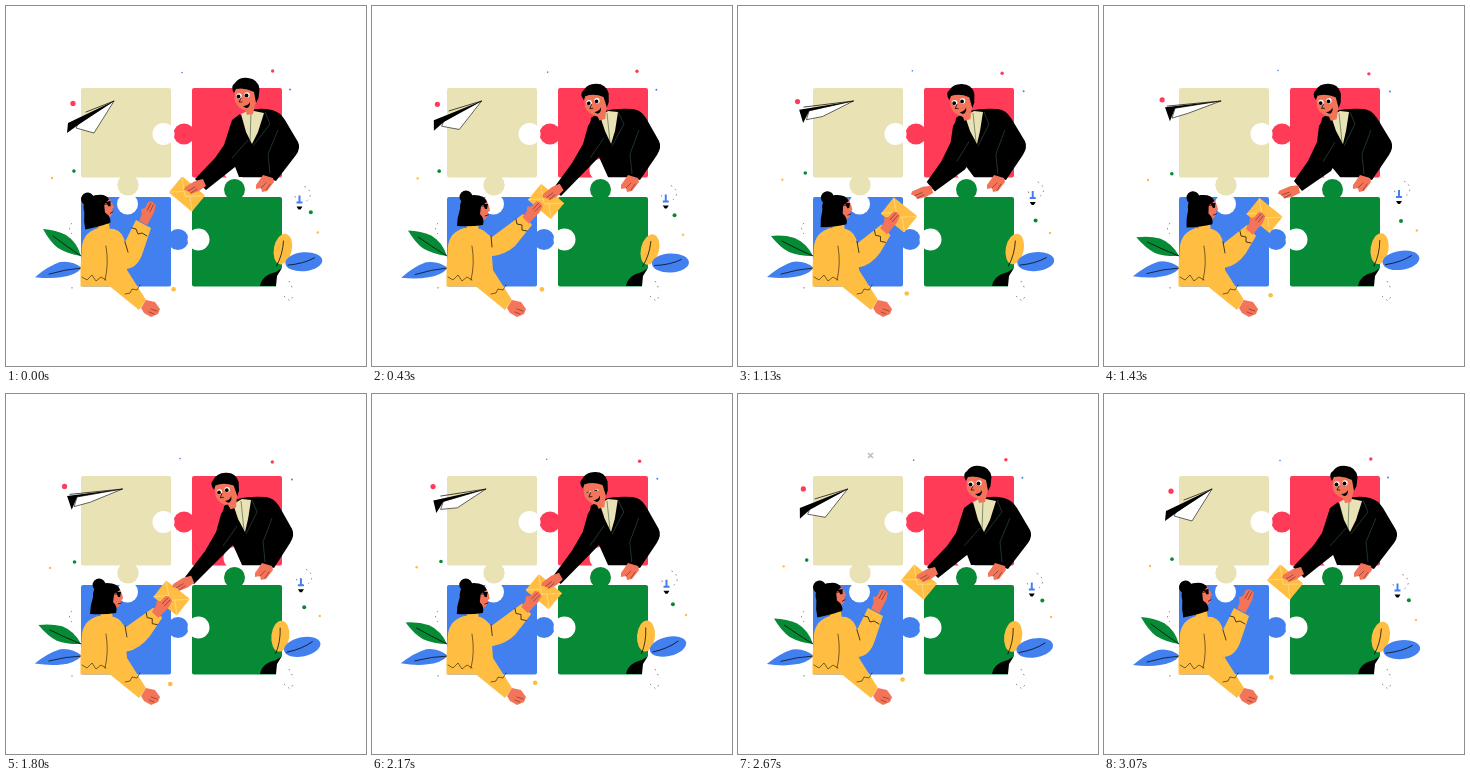
Recreate the animation shown at these times as an HTML page. Size 360 by 360 pixels, loop 3.11 s.

```html
<!DOCTYPE html>
<html lang="en">
<head>
<meta charset="utf-8">
<title>Teamwork puzzle</title>
<style>
html, body { margin: 0; width: 100%; height: 100%; overflow: hidden; background: #fff; }
svg { display: block; width: 100vw; height: 100vh; }
.cream { fill: #e9e2b4; } .red { fill: #ff3b58; } .blue { fill: #4280ef; }
.green { fill: #078a35; } .gold { fill: #ffbe42; } .skin { fill: #f4745a; }
.white { fill: #fff; }
.line { fill: none; stroke: #000; stroke-width: .7; stroke-linecap: round; }
.seam { fill: none; stroke: #35564a; stroke-width: .6; }
.dash { fill: none; stroke: #333; stroke-width: .6; stroke-dasharray: 1.5 4; }
</style>
</head>
<body>
<svg viewBox="0 0 360 360">
  <!-- puzzle -->
  <g class="cream"><rect x="75" y="82" width="90" height="89.5" rx="2"/><circle cx="122" cy="179" r="10.5"/></g>
  <g class="red"><rect x="186" y="82" width="90" height="89.5" rx="2"/><circle cx="178" cy="128" r="10.5"/></g>
  <g class="blue"><rect x="75" y="191" width="90" height="89.5" rx="2"/><circle cx="172" cy="233.5" r="10.5"/></g>
  <g class="white"><circle cx="157.5" cy="128" r="11"/><circle cx="228.5" cy="164" r="11"/><circle cx="121.5" cy="198" r="10.5"/></g>
  <g class="green"><rect x="186" y="191" width="90" height="89.5" rx="2"/><circle cx="228.5" cy="183.5" r="10.5"/></g>
  <circle class="white" cx="192.5" cy="233.5" r="11"/>
  <circle class="cream" cx="122" cy="179" r="10.5"/>

  <!-- paper plane -->
  <path id="wing" class="white" stroke="#000" stroke-width=".6"/>
  <path id="fold"/>
  <path id="crease" class="line"/>

  <!-- leaves -->
  <g id="leafA">
    <path class="green" d="M75 250Q71 236 60 229Q50 224 37 223Q44 236 52 242Q62 248 75 250Z"/>
    <path class="line" d="M75 250Q60 240 47 230"/>
  </g>
  <g id="leafB">
    <path class="blue" d="M76 262Q66 254 54 256Q42 260 29 271Q45 273 56 271Q68 270 76 262Z"/>
    <path class="line" d="M76 262Q60 263 43 268"/>
  </g>
  <path class="white" d="M277 261L270 267V281H277Z"/>
  <path d="M254 280Q256 269 270 266L276 262L271 270L270 280Z"/>
  <g id="leafC"><ellipse class="gold" rx="9" ry="15.5"/><path class="line" d="M-1 -8Q1 6 -3 18"/></g>
  <g id="leafD"><ellipse class="blue" rx="18.5" ry="9.5"/><path class="line" d="M-16 2Q0 2 11 -3"/></g>

  <!-- floating bits -->
  <g id="bulb">
    <path class="dash" d="M5 -22Q10 -20 11 -14Q10 -9 5 -6M-4 -11L-6 -16"/>
    <path class="blue" d="M-1 -13H1V-7H3V-5H-3V-7H-1Z"/>
    <path d="M-3 -2H3L1 1H-1Z"/>
  </g>
  <path class="dash" d="M66 217Q61 223 66 228M66 281V285M278 290L284 295L288 289M283 275L288 285"/>
  <path id="spark" d="M130 59L135 64M135 59L130 64" stroke="#bbb" stroke-width="1.5"/>
  <g id="dots"></g>

  <!-- man -->
  <path id="coat"/>
  <path id="shirt" class="cream"/>
  <path id="coatSeam" class="seam"/>
  <g id="farHand">
    <path class="skin" d="M257 169L267 172L268 176L261 185L256 186L255 182L250 183L250 179Z"/>
    <path class="line" d="M255 182L260 177M260 184L264 178" stroke-opacity=".5"/>
  </g>
  <g id="manHead">
    <path class="skin" d="M-1 10L2 20L8 19L11 6Z"/>
    <path class="skin" d="M-10 -7L-10.5 5Q-8 13 1 16Q7 17 10 9L13 4L11 -6Z"/>
    <path d="M-11 -2Q-15 -9 -10 -12Q-6 -18 3 -17Q13 -16 14.5 -6L13.5 3L11 8L9 -3Q0 -8 -9 -6Z"/>
    <g id="eyes"><circle class="white" cx="-6" cy="1" r="2.7"/><circle class="white" cx="2" cy="0" r="2.7"/><circle cx="-6.5" cy="1.5" r="1.9"/><circle cx="1.5" cy=".5" r="1.9"/></g>
    <path class="line" d="M-4 3L-6 7L-3 7"/>
    <path d="M-2 11Q3 11 5 7Q5 13 1 13Z"/>
  </g>
  <path id="manArm"/>
  <path id="armSeam" class="seam"/>

  <!-- woman -->
  <path class="gold" d="M76 240Q78 226 92 222L108 223Q118 226 119 238L121 264L140 294L133 304L104 280.500H74.500V262Z"/>
  <path id="collar" class="gold"/>
  <path id="womanArm" class="gold"/>
  <path class="line" d="M76 271l5 3l5 -5l4 6l5 -4l5 3M119 288l5 -1l2 -4l5 1l3 -5M100 240Q103 258 99 274" stroke-opacity=".75"/>
  <path id="sleeve" class="line"/>
  <path class="skin" d="M140 294L149 296L154 303L152 308L145 311L138 307L135 302Z"/>
  <path class="line" d="M145 303L151 305M143 306L148 308" stroke-opacity=".5"/>
  <g id="womanHead">
    <path class="skin" d="M2 -9H12Q15 -5 16 2L14 3Q14 10 8 11L3 16H-5V0Z"/>
    <path d="M-14 0Q-15 -13 0 -14Q11 -14 13 -7L7 -3L6 5Q11 10 9 16Q-3 18 -17 17Q-17 9 -14 0Z"/>
    <circle cx="-8" cy="-12" r="6.5"/>
    <path d="M9 -5L14 -5L13 0L11 0Z"/>
    <path class="line" d="M6 -3H11M11 7L14 6"/>
  </g>

  <!-- envelope and hands -->
  <g id="envelope">
    <rect class="gold" x="-15" y="-10.5" width="30" height="21" rx="1"/>
    <path d="M-15 -10L0 3L15 -10M-15 10L-4 0M15 10L4 0" fill="none" stroke="#ffe09a" stroke-width=".6"/>
  </g>
  <g id="manHand">
    <path class="skin" d="M9 -9L1 -7L-9 -1L-10 2L-6 3L-3 6L5 3L12 -2Z"/>
    <path class="line" d="M-6 3L1 -1M-3 5L3 1" stroke-opacity=".5"/>
  </g>
  <g id="womanHand">
    <path class="skin" d="M-11 -4L-4 -5L0 -8L3 -5L10 -5L12 -2L11 3L4 5L-4 5L-11 5Z"/>
    <path class="line" d="M2 -2H10M2 1H10" stroke-opacity=".5"/>
  </g>
</svg>
<script>
const LOOP = 3110;
const $ = id => document.getElementById(id);

// Blend the numbers of neighbouring strings in a list; p is a fractional index.
function blend(list, p) {
  const i = Math.min(Math.floor(p), list.length - 2), k = p - i;
  const next = list[i + 1].match(/-?\d+(\.\d+)?/g);
  let n = 0;
  return list[i].replace(/-?\d+(\.\d+)?/g, v => (+v + (next[n++] - v) * k).toFixed(2));
}

// Poses: offering, meeting, passing, received.
const posed = {
  coat: ["M233 110Q246 100 266 104Q274 106 279 114L292 136Q295 142 290 149L270 175L258 171H233L228 158L230 128Z",
         "M219 112Q232 101 261 103Q269 104 274 112L287 135Q290 141 285 149L268 174L257 171H236L227 151L217 126Z",
         "M218 112Q231 101 260 103Q268 104 273 112L286 135Q289 141 284 149L268 174L257 171H236L227 151L216 126Z",
         "M218 112Q231 101 260 103Q268 104 273 112L287 135Q290 141 285 149L268 174L257 171H236L227 160L216 126Z"],
  shirt: ["M235 108L243 104L258 107L252 126L246 138L240 126Z",
          "M228 110L236 105L246 106L243 125L239 138L233 125Z",
          "M227 110L236 105L245 106L242 125L239 138L232 125Z",
          "M227 110L236 105L245 106L242 125L239 138L232 125Z"],
  coatSeam: ["M272 124L262 148L264 168M259 106L264 118L247 140M245 107L244 136",
             "M267 124L258 148L260 168M246 106L252 118L240 140M235 107L238 136",
             "M266 124L257 148L259 168M246 106L251 118L240 140M235 107L238 136",
             "M267 124L258 148L260 168M246 106L251 118L240 140M235 107L238 136"],
  farHand: ["translate(0 0)", "translate(-1 0)", "translate(-1 0)", "translate(-1 0)"],
  manHead: ["translate(239 89) rotate(0)", "translate(223 95) rotate(-7)",
            "translate(219 96) rotate(-9)", "translate(223 95) rotate(-5)"],
  manArm: ["M234 108L226 114L218 139L209 152L189 173L200 184L229 161L246 144L238 124Z",
           "M222 110L216 120L211 138L200 157L181 183L189 190L227 151L240 140L230 122Z",
           "M221 110L215 120L210 138L199 157L179 183L188 190L227 151L239 140L229 122Z",
           "M221 110L215 120L213 136L204 155L190 175L198 185L227 165L239 144L229 122Z"],
  armSeam: ["M242 134L226 152", "M232 132L218 152", "M231 132L217 152", "M231 136L219 156"],
  manHand: ["translate(188 182) rotate(0)", "translate(180 188) rotate(-8)",
            "translate(176 191) rotate(0)", "translate(184 187) rotate(8)"],
  envelope: ["translate(181 188) rotate(40)", "translate(174 195.5) rotate(40)",
             "translate(165 204.5) rotate(38)", "translate(160.5 209.5) rotate(39)"],
  womanArm: ["M108 223L118 238L130 214L145 222L137 246Q132 262 120 263L106 250Z",
             "M108 223L120 231L151 208L160 219L143 240Q134 248 121 250L106 250Z",
             "M108 223L120 233L147 214L156 224L144 242Q134 255 121 258L106 250Z",
             "M108 223L119 238L143 219L152 230L142 247Q133 260 120 262L106 250Z"],
  sleeve: ["M119 236L122 246M126 222l4 1l2 5l4 -1l5 3", "M119 230L120 241M144 213l1 5l5 1l0 5l5 1",
           "M119 232L121 243M140 219l1 5l5 1l0 5l5 1", "M119 236L121 247M136 225l1 5l5 1l0 5l5 1"],
  womanHand: ["translate(142 207) rotate(-62)", "translate(161 206) rotate(-46)",
              "translate(156 213) rotate(-46)", "translate(152 217) rotate(-50)"],
  womanHead: ["translate(92 203) rotate(-13)", "translate(102 203) rotate(0)",
              "translate(101 203) rotate(0)", "translate(98 203) rotate(-5)"],
  collar: ["M92 218H103L104 225H92Z", "M95 218H106L107 225H94Z", "M95 218H106L107 225H94Z", "M95 218H106L107 225H94Z"]
};

// Two ends of the slow sway.
const swayed = {
  fold: ["M108 95L62 117L61 127L72 119Z", "M117 95L61 101L66 115L71 102Z"],
  wing: ["M108 95L72 118L70 122L88 127Z", "M117 95L71 102L68 112L84 107Z"],
  crease: ["M108 95L80 106", "M117 95L63 100"],
  leafA: ["rotate(0 75 250)", "rotate(-12 75 250)"],
  bulb: ["translate(293.5 202.5)", "translate(295 197)"]
};

// The same sway, starting later.
const trailing = {
  leafB: ["rotate(-1 76 262)", "rotate(2 76 262)"],
  leafC: ["translate(278 243.5) rotate(14)", "translate(274 242) rotate(5)"],
  leafD: ["translate(298.5 257) rotate(-2)", "translate(296 252.5) rotate(-13)"]
};

// Pose index over time.
const keys = [[0, 0], [60, 0], [430, 1], [830, 2], [1170, 3], [1430, 3], [1770, 2], [2170, 1.25], [2600, 0], [LOOP, 0]];
function poseAt(t) {
  const i = keys.findIndex(k => k[0] > t), [t0, a] = keys[i - 1], [t1, b] = keys[i];
  return a + (b - a) * (t - t0) / (t1 - t0);
}

// Drifting dots: colour, radius, x, swing, delay, y, swing, delay.
const dots = [
  ["red", 2.6, 62.5, 4.5, 0, 95.3, 3, 400],
  ["red", 1.7, 266, 2, 2500, 66.5, -1.5, 100],
  ["green", 1.8, 68, 1, 2300, 166.5, -1.5, 200],
  ["green", 2, 301, 4, -150, 210.5, -4.5, -200],
  ["gold", 2.3, 166.7, 3.6, 650, 286.5, -3.5, 200],
  ["gold", 1.2, 45, 1, 0, 173, -1, 0],
  ["gold", 1.2, 312.5, 1.5, 2100, 225, 4, 600],
  ["blue", 1, 285, -1, 0, 84.5, -1, 0],
  ["blue", .8, 175, 1, 0, 65.5, 1, 0]
].map(([color, r, ...path]) => {
  const el = document.createElementNS("http://www.w3.org/2000/svg", "circle");
  el.setAttribute("class", color);
  el.setAttribute("r", r);
  $("dots").append(el);
  return { el, path };
});

function apply(set, p) {
  for (const id in set) {
    const el = $(id);
    el.setAttribute(el.tagName === "g" ? "transform" : "d", blend(set[id], p));
  }
}

function draw(now) {
  const t = now % LOOP;
  const wave = delay => Math.cos((t - delay) / LOOP * 2 * Math.PI);
  apply(posed, poseAt(t));
  apply(swayed, (1 - wave(0)) / 2);
  apply(trailing, (1 - wave(550)) / 2);
  for (const { el, path: [x, dx, px, y, dy, py] } of dots) {
    el.setAttribute("cx", x + dx * wave(px));
    el.setAttribute("cy", y + dy * wave(py));
  }
  const blink = t > 2110 && t < 2240;
  $("eyes").setAttribute("transform", blink ? "translate(0 1.5) scale(1 .3)" : "");
  $("spark").style.display = t > 2600 && t < 2700 ? "" : "none";
}

const start = performance.now();
function tick() {
  draw(performance.now() - start);
  requestAnimationFrame(tick);
}
tick();
</script>
</body>
</html>
```
